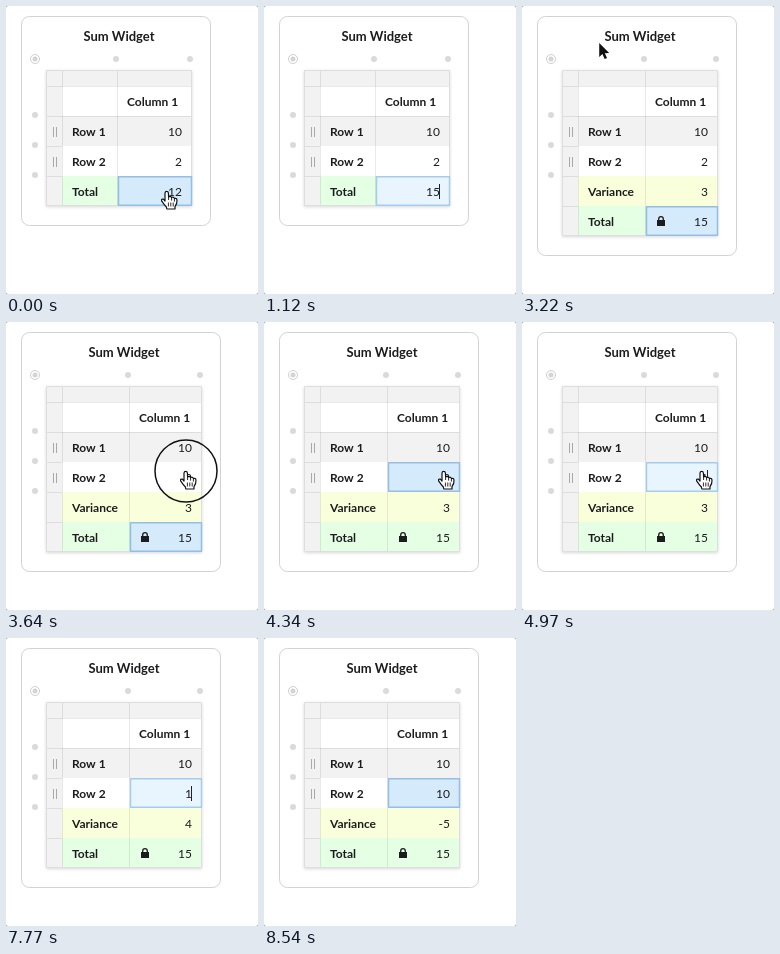
These frames come from a looping animation (252 px wide and 288 px high, 8.96 s). An HTML page with a canvas:

```html
<!DOCTYPE html>
<html lang="en">
<head>
<meta charset="utf-8">
<title>Sum Widget</title>
<style>
html, body { margin: 0; width: 100%; height: 100%; overflow: hidden; background: #fff; }
canvas { display: block; width: 252px; height: 288px; }
</style>
</head>
<body>
<canvas id="stage"></canvas>
<script>
const W = 252, H = 288, LOOP = 8960, STEP = 70;
const canvas = document.getElementById('stage');
const ctx = canvas.getContext('2d');
const dpr = window.devicePixelRatio || 1;
canvas.width = W * dpr;
canvas.height = H * dpr;

const INK = '#1c1c1e', LINE = '#dedede', GRAY = '#f2f2f2';
const YELLOW = '#faffdb', GREEN = '#e5ffe5';
const SELECTED = [213, 235, 252], EDITING = [232, 245, 255];
const LEFT = 40, LABEL = 56, TOP = 64;

const clamp = v => Math.max(0, Math.min(1, v));
const ease = v => v * v * (3 - 2 * v);
const mix = (a, b, k) => 'rgb(' + a.map((v, i) => Math.round(v + (b[i] - v) * k)) + ')';

function rect(x, y, w, h, fill) {
  ctx.fillStyle = fill;
  ctx.fillRect(x, y, w, h);
}

function disc(x, y, r, fill) {
  ctx.beginPath();
  ctx.arc(x, y, r, 0, Math.PI * 2);
  ctx.fillStyle = fill;
  ctx.fill();
}

function ring(x, y, r, color, width) {
  ctx.beginPath();
  ctx.arc(x, y, r, 0, Math.PI * 2);
  ctx.strokeStyle = color;
  ctx.lineWidth = width;
  ctx.stroke();
}

function text(str, x, y, { size = 12, weight = 400, align = 'left' } = {}) {
  ctx.font = `${weight} ${size}px Lato, sans-serif`;
  ctx.textAlign = align;
  ctx.fillStyle = INK;
  ctx.fillText(str, x, y);
}

function drawCard(wide) {
  const right = wide ? 214.5 : 204.5, bottom = wide ? 249.5 : 219.5;
  ctx.beginPath();
  ctx.roundRect(15.5, 10.5, right - 15.5, bottom - 10.5, 8);
  ctx.strokeStyle = '#d2d2d2';
  ctx.lineWidth = 1;
  ctx.stroke();
  text('Sum Widget', wide ? 118 : 113, 35, { size: 13, weight: 700, align: 'center' });
  ring(29, 53, 4.5, '#cfcfcf', 1);
  disc(29, 53, 2.5, '#d4d4d4');
  const dots = [[wide ? 122 : 110, 53], [wide ? 194 : 184, 53], [29, 109], [29, 139], [29, 169]];
  for (const [x, y] of dots) disc(x, y, 3, '#dadada');
}

function drawLock(x, y) {
  rect(x, y + 4, 8, 6, INK);
  ctx.beginPath();
  ctx.moveTo(x + 1.7, y + 5);
  ctx.lineTo(x + 1.7, y + 3);
  ctx.arc(x + 4, y + 3, 2.3, Math.PI, 0);
  ctx.lineTo(x + 6.3, y + 5);
  ctx.strokeStyle = INK;
  ctx.lineWidth = 1.3;
  ctx.stroke();
}

function drawTable(s) {
  const col = s.wide ? 124 : 112, right = s.wide ? 196 : 186;
  const rows = [['Row 1', '10', GRAY], ['Row 2', s.row2, '#fff']];
  if (s.wide) rows.push(['Variance', s.variance, YELLOW]);
  rows.push(['Total', s.total, GREEN]);
  const bottom = 110 + rows.length * 30;

  ctx.save();
  ctx.shadowColor = 'rgba(0,0,0,.16)';
  ctx.shadowBlur = 3 * dpr;
  ctx.shadowOffsetY = dpr;
  rect(LEFT, TOP, right - LEFT, bottom - TOP, '#fff');
  ctx.restore();

  rect(LEFT, TOP, right - LEFT, 16, GRAY);
  rect(LEFT, 80, 16, bottom - 80, GRAY);
  rows.forEach(([, , fill], i) => rect(LABEL, 110 + i * 30, right - LABEL, 30, fill));

  const line = 'rgba(0,0,0,.085)';
  rect(LEFT, 80, right - LEFT, 1, line);
  rows.forEach((_, i) => rect(LEFT, 110 + i * 30, i ? 16 : right - LEFT, 1, line));
  for (const x of [LABEL, col - 1]) rect(x, TOP, 1, bottom - TOP, line);
  ctx.strokeStyle = LINE;
  ctx.lineWidth = 1;
  ctx.strokeRect(LEFT + .5, TOP + .5, right - LEFT - 1, bottom - TOP - 1);

  for (const y of [121, 151]) {
    rect(47, y, 1, 10, '#a9a9a9');
    rect(50, y, 1, 10, '#a9a9a9');
  }

  // The active cell is the last row or Row 2
  const y = s.active === 'total' ? bottom - 30 : 140;
  rect(col, y, right - col, 30, mix(SELECTED, EDITING, s.edit));
  ctx.strokeStyle = mix([148, 190, 228], [165, 205, 235], s.edit);
  ctx.lineWidth = 1.5;
  ctx.strokeRect(col + .5, y + .75, right - col - 1, 28.5);

  text('Column 1', col + 9, 100, { weight: 700 });
  const end = right - 10;
  rows.forEach(([label, value], i) => {
    const base = 130 + i * 30;
    text(label, 66, base, { weight: 700 });
    text(value, end, base, { align: 'right' });
  });
  if (s.wide) drawLock(135, 210);
  if (s.caret) rect(end - 1, y + 8, 1, 15, '#222');
}

function shape(points, x, y) {
  ctx.beginPath();
  points.forEach(([px, py], i) => ctx[i ? 'lineTo' : 'moveTo'](x + px, y + py));
  ctx.closePath();
  ctx.lineJoin = 'round';
}

function drawHand(x, y) {
  ctx.save();
  ctx.translate(x, y);
  ctx.beginPath();
  ctx.moveTo(-2, 10);
  ctx.lineTo(-2, 2);
  ctx.quadraticCurveTo(-1.8, .3, -.2, .4);
  ctx.quadraticCurveTo(1.2, .4, 1.4, 2);
  ctx.lineTo(1.6, 6);
  ctx.quadraticCurveTo(3.4, 4.6, 4.6, 6.6);
  ctx.quadraticCurveTo(6.6, 5.4, 7.4, 7.6);
  ctx.quadraticCurveTo(9.8, 6.8, 10, 9.2);
  ctx.quadraticCurveTo(10.2, 13, 8, 15.5);
  ctx.lineTo(8, 18);
  ctx.lineTo(-.2, 18);
  ctx.lineTo(-.6, 16);
  ctx.quadraticCurveTo(-3, 13.4, -5.4, 9.8);
  ctx.quadraticCurveTo(-5.8, 7.6, -3.6, 8.2);
  ctx.closePath();
  ctx.lineJoin = 'round';
  ctx.fillStyle = '#fff';
  ctx.fill();
  ctx.strokeStyle = '#111';
  ctx.lineWidth = 1.2;
  ctx.stroke();
  ctx.beginPath();
  for (const [lx, top] of [[1.6, 6], [4.6, 6.6], [7.4, 7.6]]) {
    ctx.moveTo(lx, top);
    ctx.lineTo(lx, top + 3);
  }
  for (const lx of [1.4, 3.8, 6.2]) {
    ctx.moveTo(lx, 11.5);
    ctx.lineTo(lx, 15.5);
  }
  ctx.lineWidth = .9;
  ctx.stroke();
  ctx.restore();
}

function drawArrow(x, y) {
  shape([[0, 0], [0, 14], [3.2, 11], [5.4, 16], [7.8, 15], [5.6, 10.2], [10, 10]], x, y);
  ctx.strokeStyle = '#fff';
  ctx.lineWidth = 2;
  ctx.stroke();
  ctx.fillStyle = '#111';
  ctx.fill();
}

function pointerAt(t) {
  if (t < 840) return { x: 161, y: 185 };
  if (t < 3150 || t >= 5040) return null;
  const k = ease(clamp((t - 3150) / 420));
  return { x: 69 + 111 * k, y: 28 + 121 * k };
}

function stateAt(t) {
  const s = { wide: t >= 1890, active: 'total', edit: 0, caret: false, row2: '2', variance: '3', total: '15' };
  if (t < 840) s.total = '12';
  else if (t < 1120) s.total = '1';

  if (t >= 840 && t < 1890) {
    s.edit = clamp((t - 770) / 280);
    s.caret = t < 1680;
  }
  if (t >= 3710) s.active = 'row2';
  if (t >= 4410 && t < 5250) {
    s.edit = clamp((t - 4340) / 280);
    s.row2 = t < 4970 ? '' : '1';
    s.caret = t >= 4970;
  }
  if (t >= 5250) {
    s.row2 = t < 7840 ? '1' : '10';
    s.variance = t < 8470 ? '4' : '-5';
  }
  if (t >= 7770 && t < 8470) {
    s.edit = 1;
    s.caret = t < 8330;
  }
  return s;
}

function draw(now) {
  const t = Math.floor((now % LOOP) / STEP) * STEP;
  ctx.setTransform(dpr, 0, 0, dpr, 0, 0);
  rect(0, 0, W, H, '#8a8a8a');
  ctx.beginPath();
  ctx.roundRect(0, 0, W, H, 2);
  ctx.fillStyle = '#fff';
  ctx.fill();

  const s = stateAt(t);
  drawCard(s.wide);
  drawTable(s);

  const p = pointerAt(t);
  if (p) (p.x > 112 && p.y > 64 ? drawHand : drawArrow)(p.x, p.y);
  if (t >= 3570 && t < 3780) ring(p.x, p.y, 31, '#111', 1.5);
  requestAnimationFrame(() => draw(performance.now()));
}

draw(performance.now());
</script>
</body>
</html>
```
